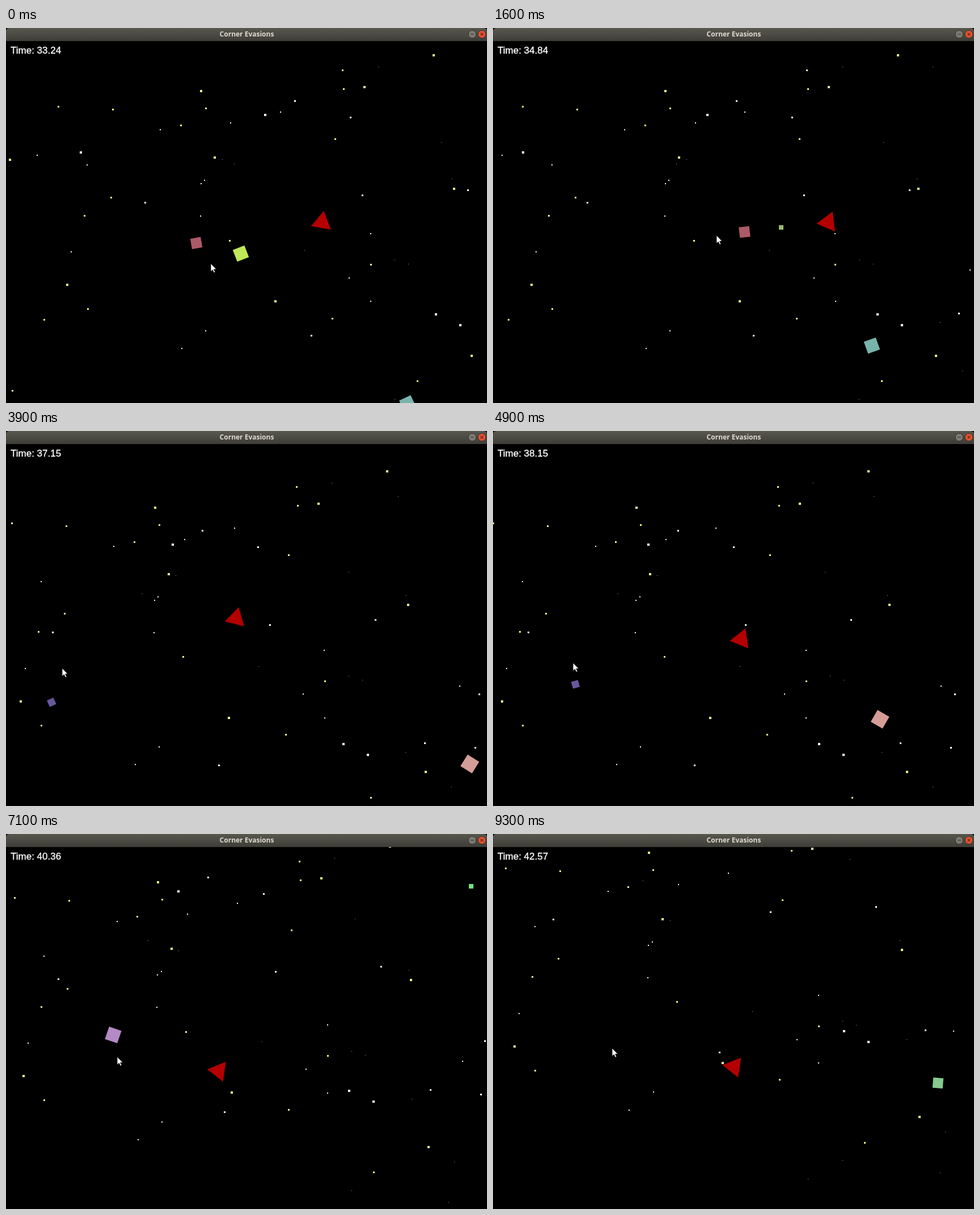
Write an HTML page that moves like this. It is 848 px wide and 660 px high and loops after 9.4 s.

```html
<!DOCTYPE html>
<html lang="en">
<head>
<meta charset="utf-8">
<title>Corner Evasions</title>
<style>
html, body { margin: 0; width: 100%; height: 100%; overflow: hidden; background: #000; }
svg { display: block; width: 848px; height: 660px; }
.caption { font: bold 12px "Open Sans", "Noto Sans", sans-serif; fill: #dfdbd2; text-anchor: middle; }
.clock { font: 17px "Liberation Sans", Arial, sans-serif; fill: #fff; stroke: #fff; stroke-width: .35; }
</style>
</head>
<body>
<svg viewBox="0 0 848 660">
  <defs>
    <linearGradient id="bar" x2="0" y2="1">
      <stop offset="0" stop-color="#59584f"/>
      <stop offset="1" stop-color="#3d3c37"/>
    </linearGradient>
  </defs>
  <rect width="848" height="660"/>
  <g id="stars" shape-rendering="crispEdges"></g>
  <g id="shots" shape-rendering="crispEdges"></g>
  <g id="foes"></g>
  <path id="ship" fill="#b40000"/>
  <text id="clock" class="clock" x="8" y="45"></text>
  <path id="mouse" d="M0 0V14.2L3.3 11.2 5.6 16.2 7.9 15.2 5.6 10.3H10Z" fill="#fff" stroke="#000" stroke-width=".8"/>
  <path d="M0 23V6Q0 0 6 0H842Q848 0 848 6V23Z" fill="url(#bar)"/>
  <text class="caption" x="424.5" y="15">Corner Evasions</text>
  <circle cx="822" cy="11" r="6.8" fill="#7d7b72" stroke="#33322e"/>
  <path d="M819 11H825" stroke="#3a3934" stroke-width="1.2"/>
  <circle cx="839" cy="11" r="6.8" fill="#e6512d" stroke="#33322e"/>
  <path d="M836.7 8.7L841.3 13.3M841.3 8.7L836.7 13.3" stroke="#57281b" stroke-width="1.2"/>
</svg>
<script>
const LOOP = 9.4, STEP = 0.1, SCROLL = 24.75;
const YELLOW = '#f0f58c', WHITE = '#fff', DIM = '#a8a8a8';
const $ = id => document.getElementById(id);
const smooth = u => u * u * (3 - 2 * u);

function set(el, attrs) {
  for (const k in attrs) el.setAttribute(k, attrs[k]);
}
function make(parent, size, fill) {
  const el = document.createElementNS('http://www.w3.org/2000/svg', 'rect');
  set(el, { x: -size / 2, y: -size / 2, width: size, height: size, fill });
  return $(parent).appendChild(el);
}
function show(el, on) {
  el.style.display = on ? '' : 'none';
  return on;
}

// Stars: the bright ones are placed, the faint dust is scattered.
const stars = [];
function star(depth, size, fill, x, y) {
  stars.push({ depth, x: x - size / 2, y: y - size / 2, el: make('stars', size, fill) });
}
function place(depth, size, fill, ...points) {
  for (const [x, y] of points) star(depth, size, fill, x, y);
}
place(1, 4, YELLOW, [753.5, 47.5], [344, 111], [632, 104], [368, 228], [6.5, 232],
  [790, 282.5], [107.5, 452], [474.5, 481], [821, 576.5]);
place(1, 3, YELLOW, [593.5, 74.5], [92, 138.5], [188, 143.5], [580, 195], [185, 298], [138.5, 330],
  [643.5, 416.5], [144, 494.5], [67, 513], [725, 621.5], [595.5, 107.5], [352, 141.5],
  [308, 171.5], [394, 374], [575, 511], [11.5, 638]);
place(2, 4, WHITE, [457, 153], [132, 218.5], [757.5, 504], [800.5, 522.5]);
place(2, 3, WHITE, [509, 128.5], [607, 157.5], [628, 294], [814, 285], [245.5, 307],
  [901, 502], [997, 416.5], [990, 510.5], [538.5, 541]);

let seed = 7;
const random = () => (seed = seed * 16807 % 2147483647) / 2147483647;
for (let i = 0; i < 30; i++) {
  const size = 1 + i % 2;
  star(i % 6 ? 1 : 2, size, size > 1 ? WHITE : DIM, random() * 940, 30 + random() * 710);
}

// The field scrolls at one speed while a direction is held: [direction, from, to].
const holdX = [[-1, 0, 3.29], [-1, 4.5, 4.93], [1, 6.465, 7.386]];
const holdY = [[1, 2.56, 3.51], [-1, 4.94, 5.8], [-1, 5.96, 9.22]];
const drift = (holds, t) => holds.reduce(
  (sum, [dir, from, to]) => sum + dir * SCROLL * Math.max(0, Math.min(t, to) - from), 0);

// Key points: [time, x, y]
const shipKeys = [[0, 557, 341.7], [1.6, 590.7, 342], [2.8, 510.7, 312.5], [3.9, 405.3, 329.7],
  [4.7, 440, 358], [5.8, 404.3, 403.2], [7.1, 375, 417], [9.3, 424.7, 409.5]];
const mouseKeys = [[0, 361, 414.5], [1.4, 394, 365], [2.4, 643, 515], [3.8, 99, 417.5],
  [5.6, 247, 384], [6.4, 500, 400], [7, 196, 392], [9.3, 210, 377]];

function span(keys, t) {
  let i = 0;
  while (i < keys.length - 2 && t >= keys[i + 1][0]) i++;
  return [i, (t - keys[i][0]) / (keys[i + 1][0] - keys[i][0])];
}
function blend(keys, t, ease = u => u) {
  const [i, u] = span(keys, t), w = ease(u);
  return [1, 2].map(k => keys[i][k] + (keys[i + 1][k] - keys[i][k]) * w);
}
function spline(keys, t) {
  const [i, u] = span(keys, t), a = keys[i], b = keys[i + 1], dt = b[0] - a[0], h = smooth(u);
  const slope = (n, k) => {
    const p = keys[Math.max(n - 1, 0)], q = keys[Math.min(n + 1, keys.length - 1)];
    return (q[k] - p[k]) / (q[0] - p[0]);
  };
  return [1, 2].map(k => a[k] * (1 - h) + b[k] * h
    + dt * u * (1 - u) * (slope(i, k) * (1 - u) - slope(i + 1, k) * u));
}
const restThenMove = u => smooth(Math.max(0, (u - 0.4) / 0.6));

// Squares fly straight between their points, and beyond them until they die.
const movers = [];
function mover(layer, size, fill, born, dies, ...path) {
  movers.push({ born, dies, path, turns: layer === 'foes', el: make(layer, size, fill) });
}
mover('foes', 22, '#c0e85a', 0, 0.8, [0, 414, 397], [1, 479, 373]);
mover('foes', 18.5, '#ad5a68', 0, 1.7, [0, 335.5, 378.5], [1.6, 443.5, 359]);
mover('foes', 22.3, '#78b4ac', 0, 2.4, [1.6, 668, 559], [2.4, 648, 508]);
mover('foes', 12.5, '#68579f', 2.5, 6.1, [2.8, 16.8, 490], [3.9, 80.3, 477.5], [5.8, 204, 417.5]);
mover('foes', 24, '#d59d97', 3.5, 6.4, [3.9, 817.7, 586], [5.8, 560.5, 436.5]);
mover('foes', 23, '#b48ac6', 5.4, 7.5, [5.8, 33.5, 352.3], [7.1, 189, 353.7]);
mover('foes', 20, '#eeabda', 5.4, 6.8, [5.8, 103.2, 632.3], [6.8, 183, 575]);
mover('foes', 18, '#86ca8e', 8.7, LOOP, [8.7, 870, 446], [9.3, 784.5, 438.3]);
mover('shots', 8, '#98b96c', 1.5, 1.75, [1.6, 508, 351], [1.7, 458, 357]);
mover('shots', 8, '#74e57c', 6.2, 7.3, [6.1, 415, 388], [7.1, 820, 92]);

function draw(t) {
  const dx = drift(holdX, t), dy = drift(holdY, t);
  for (const s of stars)
    set(s.el, { x: Math.round(s.x + dx * s.depth), y: Math.round(s.y + dy * s.depth) });

  const [px, py] = spline(shipKeys, t);
  const [mx, my] = blend(mouseKeys, t, restThenMove);
  const aim = Math.atan2(my - py, mx - px);
  const corners = [0, 1, 2].map(i => {
    const a = aim + i * Math.PI * 2 / 3;
    return (px + 20.3 * Math.cos(a)).toFixed(2) + ' ' + (py + 20.3 * Math.sin(a)).toFixed(2);
  });
  set($('ship'), { d: 'M' + corners.join('L') + 'Z' });
  set($('mouse'), { transform: `translate(${mx} ${my})` });

  for (const m of movers) {
    if (!show(m.el, t >= m.born && t <= m.dies)) continue;
    const [x, y] = blend(m.path, t);
    const turn = m.turns ? Math.atan2(py - y, px - x) * 180 / Math.PI : 0;
    set(m.el, { transform: `translate(${x} ${y}) rotate(${turn})` });
  }

  $('clock').textContent = 'Time: ' + (33.24 + t * 1.003).toFixed(2);
}

const start = performance.now();
function tick() {
  const t = (performance.now() - start) / 1000 % LOOP;
  draw(Math.floor(t / STEP + 1e-6) / 10);
  requestAnimationFrame(tick);
}
tick();
</script>
</body>
</html>
```
